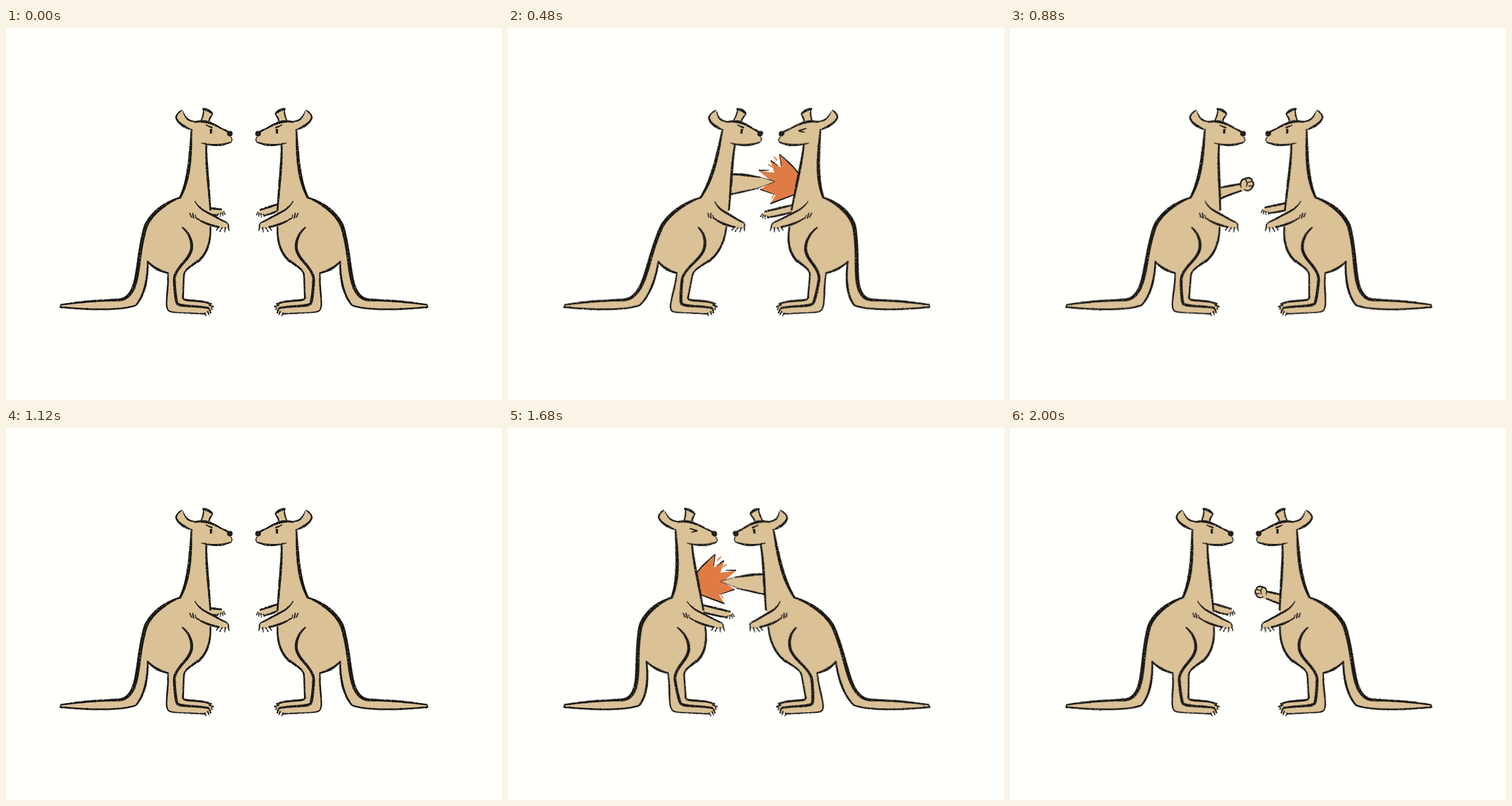
Recreate the animation shown at these times as an HTML page. Size 864 by 648 pixels, loop 2.08 s.

```html
<!DOCTYPE html>
<html lang="en">
<head>
<meta charset="utf-8">
<title>Boxing kangaroos</title>
<style>
  html, body { margin: 0; width: 100%; height: 100%; overflow: hidden; background: #fffffb; }
  svg { display: block; width: 864px; height: 648px; }
  .fur { fill: #dac196; }
  .ink { fill: #191714; filter: url(#crayon); }
  .flash { fill: #df7c46; }
</style>
</head>
<body>
<svg id="stage" viewBox="0 0 864 648">
  <defs>
    <filter id="crayon" filterUnits="userSpaceOnUse" x="-40" y="-40" width="944" height="728" color-interpolation-filters="sRGB">
      <feTurbulence type="fractalNoise" baseFrequency="0.45" numOctaves="2" seed="4" result="noise"/>
      <feDisplacementMap in="SourceGraphic" in2="noise" scale="2" xChannelSelector="R" yChannelSelector="G" result="rough"/>
      <feColorMatrix in="noise" values="0 0 0 0 0  0 0 0 0 0  0 0 0 0 0  0 0 4 0 -0.5" result="grain"/>
      <feComposite in="rough" in2="grain" operator="in"/>
    </filter>
  </defs>
</svg>
<script>
const STEP = 80, SLOTS = 26, MIRROR = 829;
const FOOT_Y = 485, HEIGHT = 305;
const stage = document.getElementById('stage');

function add(parent, tag, attrs = {}) {
  const el = document.createElementNS('http://www.w3.org/2000/svg', tag);
  for (const key in attrs) el.setAttribute(key, attrs[key]);
  parent.appendChild(el);
  return el;
}

const mix = (a, b, t) => a + (b - a) * t;
const mixPoint = (a, b, t) => [mix(a[0], b[0], t), mix(a[1], b[1], t)];
const show = (el, on) => el.setAttribute('display', on ? 'inline' : 'none');

// Outline of a pen stroke whose width runs through the given values.
const probe = document.createElementNS('http://www.w3.org/2000/svg', 'path');
function brush(d, ...widths) {
  probe.setAttribute('d', d);
  const length = probe.getTotalLength();
  const count = Math.max(4, Math.round(length / 4));
  const left = [], right = [];
  for (let i = 0; i <= count; i++) {
    const at = length * i / count;
    const p = probe.getPointAtLength(at);
    const a = probe.getPointAtLength(Math.max(0, at - 1));
    const b = probe.getPointAtLength(Math.min(length, at + 1));
    const size = Math.hypot(b.x - a.x, b.y - a.y) || 1;
    const pos = i / count * (widths.length - 1);
    const k = Math.min(Math.floor(pos), widths.length - 2);
    const half = mix(widths[k], widths[k + 1], pos - k) / 2;
    const nx = -(b.y - a.y) / size * half, ny = (b.x - a.x) / size * half;
    left.push((p.x + nx).toFixed(1) + ' ' + (p.y + ny).toFixed(1));
    right.unshift((p.x - nx).toFixed(1) + ' ' + (p.y - ny).toFixed(1));
  }
  return 'M' + left.concat(right).join('L') + 'Z';
}
const strokes = list => list.map(s => brush(...s)).join('');

const BODY = `M322 178L318 174C308 171 300 165 296 157L299 149L306 143L309 151C313 159 320 164 328 162
  L339 161L344 142L360 150L354 163C368 170 378 178 390 180L394 186L392 191L395 195C385 203 365 205 349 203
  C348 235 353 290 356 322L380 337L388 343L386 350L370 348L357 344C358 375 352 392 334 407
  C322 415 311 420 310 430L308 471C315 476 340 475 355 480L360 487L355 497L320 496L286 495
  C278 493 279 484 281 465L283 427C268 424 257 418 247 407C247 440 240 468 226 483C200 493 140 491 95 486
  L97 482C125 478 150 475 190 474C206 474 218 470 226 440C233 405 232 388 242 350
  C248 328 275 304 304 295C320 262 321 225 322 178Z`;

const OUTLINE = [
  // ears and head
  ['M325 178C309 172 300 166 296 156', 2, 4.5, 3],
  ['M296 157C297 150 301 146 307 143', 3, 2],
  ['M308 145C312 157 318 162 328 163', 1.5, 3, 2.5],
  ['M340 161C343 154 345 148 344 141', 2, 2.5, 2],
  ['M342 141C349 141 355 144 360 150', 3, 5, 3],
  ['M360 150C357 154 354 158 353 164', 2, 3, 2],
  ['M328 164C350 159 362 168 387 181', 3, 5, 3, 3],
  ['M391 190C393 191 395 194 393 197', 1.5, 2],
  ['M393 198C378 206 355 205 340 200', 2, 4, 3.5, 1],
  // neck, back and tail
  ['M323 179C321 225 320 262 303 296', 3, 5.5, 6, 4],
  ['M305 295C275 304 248 328 242 350C232 388 233 405 226 440C218 470 206 474 190 474C150 475 125 478 96 482', 3, 6.5, 7, 6.5, 7, 6, 4, 4, 2.5],
  ['M247 407C247 440 240 468 226 483C200 493 140 491 94 486', 3, 4, 3, 3, 3, 3],
  ['M96 481L94 487', 2, 2],
  ['M246 406C258 419 270 424 283 427', 2.5, 4.5, 3],
  // chest and belly
  ['M349 203C348 235 353 270 356 318', 3, 4.5, 4, 3],
  ['M356 346C357 372 351 393 333 408', 3, 3.5, 4, 4],
  // legs and feet
  ['M307 347C320 358 325 372 323 386C319 405 293 418 293 440C294 455 295 468 298 480C305 486 330 483 354 488', 2.5, 5, 5, 4.5, 5, 5, 4, 3.5],
  ['M335 405C322 416 311 420 310 430C309 445 309 460 308 472C318 477 340 473 358 481', 4, 3, 3, 4, 3],
  ['M282 426C284 450 277 478 281 489C283 496 292 495 305 496', 2.5, 3, 2.5, 2],
  ['M305 496L347 498', 2, 2.5],
  ['M353 482L362 486', 2.5, 2.5], ['M358 486L359 492', 2, 1.5],
  ['M354 489L357 497', 3, 2], ['M351 493L354 501', 2.5, 1.5], ['M346 496L349 502', 2.5, 1.5],
  // near arm
  ['M329 302C335 312 342 317 352 322L380 337C385 338 388 341 388 346', 1.5, 3, 3.5, 3, 2],
  ['M331 331C345 340 357 344 372 347', 2, 4, 3],
  ['M371 346L366 353', 2.5, 1.5], ['M377 347L372 355', 2.5, 1.5],
  ['M382 347L381 356', 2.5, 1.5], ['M387 345L389 354', 2.5, 1.5],
  ['M320 322L323 330', 2, 2], ['M325 322L327 332', 2, 2], ['M329 325L331 332', 1.5, 1.5]
];
const OPEN_EYE = [['M348 169L360 174', 1.5, 3], ['M357 176L357 184', 4, 3.5]];
const SHUT_EYE = [['M348 175L361 179', 2, 2.5], ['M361 179L349 182', 2.5, 1.5]];
const NOSE = 'M385 184a5 5 0 1 0 10 0a5 5 0 1 0 -10 0Z';

const FIST = 'M-12 6C-15 -3 -11 -12 -4 -11C2 -15 11 -12 9 -7C14 -5 14 3 10 6C8 13 0 14 -5 10Z';
const FIST_INK = strokes([
  ['M-11 6C-15 -3 -11 -12 -4 -11C2 -15 11 -12 9 -7C14 -5 14 3 10 6C8 13 0 14 -5 10', 2, 3.5, 3, 3, 2.5],
  ['M-4 -10C1 -5 2 0 -2 5', 2, 2.5, 1.5], ['M9 -6L2 -4', 2, 2], ['M11 3L3 3', 2, 2]
]);
const CLAWS = strokes([
  ['M-3 2L-5 7', 2, 1.5], ['M1 1L0 8', 2.5, 1.5], ['M4 0L5 7', 2.5, 1.5], ['M6 -2L9 4', 2, 1.5]
]);

const STAR = 'M473 219L494 239L511 257L506 288L486 296L457 306L466 291L439 281L460 268L437 249L464 252L457 231L475 243Z';
const STAR_INK = [
  ['M474 220L495 240L508 255', 1, 2.5, 2], ['M437 248L455 248', 2.5, 1], ['M458 231L470 240', 2.5, 1],
  ['M473 220L476 240', 1.5, 1], ['M439 281L464 290', 2, 1], ['M457 306L497 291', 2.5, 2]
];
const SPARKS = [['M453 238L461 242', 2, 2], ['M463 224L469 231', 2, 2], ['M459 297L463 291', 2, 2]];

function makeStar(transform) {
  const g = add(stage, 'g', { transform });
  add(g, 'path', { class: 'flash', d: STAR + strokes(SPARKS) });
  add(g, 'path', { class: 'ink', d: strokes(STAR_INK) });
  return g;
}

function makeArm(layer) {
  const g = add(layer, 'g');
  const fur = add(g, 'path', { class: 'fur' });
  const palm = add(g, 'path', { class: 'fur', d: FIST });
  const ink = add(g, 'path', { class: 'ink' });
  const hand = add(g, 'path', { class: 'ink' });
  return { g, fur, palm, ink, hand };
}

function makeBody(layer) {
  const g = add(layer, 'g');
  add(g, 'path', { class: 'fur', d: BODY });
  add(g, 'path', { class: 'ink', d: strokes(OUTLINE) + NOSE });
  const open = add(g, 'path', { class: 'ink', d: strokes(OPEN_EYE) });
  const shut = add(g, 'path', { class: 'ink', d: strokes(SHUT_EYE) });
  return { g, open, shut };
}

// Leans are head offsets: building up, landing a blow, backing off, taking a blow.
const roos = [
  { build: 27, blow: 50, back: 11, hurt: 31, shift: 3, rest: [373, 321], restTop: 313, star: '', flip: '' },
  { build: 24, blow: 43, back: 14, hurt: 38, shift: 0, rest: [384, 322], restTop: 305,
    star: `matrix(-1 0 0 1 ${MIRROR + 5} 0)`, flip: `matrix(-1 0 0 1 ${MIRROR} 0)` }
];
for (const roo of roos) roo.flash = makeStar(roo.star);
const armLayer = add(stage, 'g'), bodyLayer = add(stage, 'g');
for (const roo of roos) {
  roo.arm = makeArm(add(armLayer, 'g', { transform: roo.flip }));
  roo.body = makeBody(add(bodyLayer, 'g', { transform: roo.flip }));
}

function drawReach(arm, top, low, [x, y], fist) {
  const dx = fist ? -11 : 3, up = fist ? -1 : -5, down = fist ? 11 : 5;
  const upper = `M350 ${top}L${x + dx} ${y + up}`;
  const lower = `M352 ${low}Q${mix(352, x, .5)} ${mix(low, y + down, .7)} ${x + (fist ? -9 : -4)} ${y + down}`;
  arm.fur.setAttribute('d', `M340 ${top}L350 ${top}L${x + dx} ${y + up}L${x + 5} ${y}L${x - 4} ${y + down}L352 ${low}Z`);
  arm.ink.setAttribute('d', brush(upper, 2.5, 4, 3) + brush(lower, 3, 3.5, 2.5));
}

function drawPunch(arm) {
  arm.fur.setAttribute('d', 'M340 255L352 255L394 259L428 267L400 279L351 291L340 291Z');
  arm.ink.setAttribute('d', strokes([
    ['M350 255C368 254 385 258 402 260', 3, 4.5, 2], ['M350 291L402 279', 3, 3, 2],
    ['M402 260L428 267', 1, 1], ['M402 278L428 268', 1, 1]
  ]));
}

function pose(roo, attacks, t, hit, extra) {
  const { arm, body } = roo;
  const lean = attacks ? (hit ? roo.blow + extra : roo.build * t)
                       : -(hit ? roo.hurt + extra : roo.back * Math.sqrt(t));
  const shift = t > 0 ? roo.shift : 0;
  const skew = (lean - shift) / HEIGHT;
  const transform = `matrix(1 0 ${-skew} 1 ${shift + skew * FOOT_Y} 0)`;
  body.g.setAttribute('transform', transform);
  arm.g.setAttribute('transform', transform);
  show(body.open, attacks || !hit);
  show(body.shut, !attacks && hit);
  show(roo.flash, attacks && hit);

  const punch = attacks && hit, fist = attacks && t > 0 && !hit;
  show(arm.palm, fist);
  show(arm.hand, !punch);
  if (punch) return drawPunch(arm);

  let hand = roo.rest, top = roo.restTop, low = top + 12;
  if (fist) {
    const k = Math.max(0, (t - .25) / .75);
    hand = mixPoint([388, 286], [415, 257], k);
    top = mix(291, 265, k);
    low = mix(308, 288, k);
  } else if (t > 0) {
    hand = hit ? [400, 325] : mixPoint([382, 322], [393, 315], t);
    top = hit ? 307 : 304;
    low = top + 13;
  }
  drawReach(arm, top, low, hand, fist);
  const place = `translate(${hand[0]} ${hand[1]}) scale(${fist ? mix(.72, 1, t) : 1})`;
  arm.palm.setAttribute('transform', place);
  arm.hand.setAttribute('transform', place);
  arm.hand.setAttribute('d', fist ? FIST_INK : CLAWS);
}

// Each bout swings out and back: the left one lasts 14 steps, the right one 12.
function draw(slot) {
  const first = slot < 14;
  const span = first ? 14 : 12, windup = first ? 5 : 4;
  const at = first ? slot : slot - 14;
  const k = Math.min(at, span - at);
  const t = Math.min(1, k / windup), hit = k > windup;
  const extra = k === windup + 2 ? 2 : 0;
  pose(roos[0], first, t, hit, extra);
  pose(roos[1], !first, t, hit, extra);
}

let last = -1;
function tick() {
  const slot = Math.floor(performance.now() / STEP) % SLOTS;
  if (slot !== last) draw(last = slot);
  requestAnimationFrame(tick);
}
tick();
</script>
</body>
</html>
```
